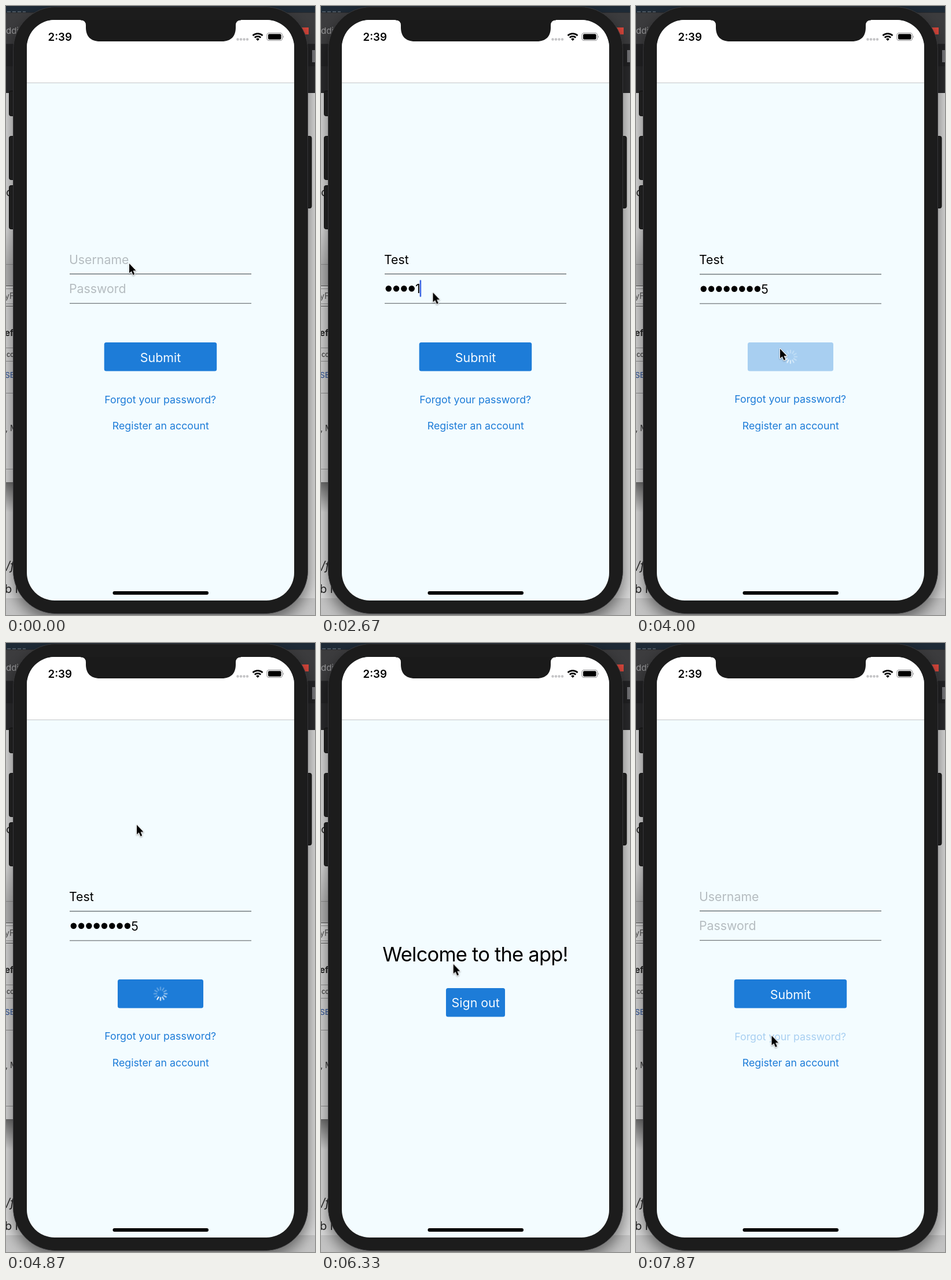
Write an HTML page that moves like this. It is 534 px wide and 1050 px high and loops after 8 s.

```html
<!DOCTYPE html>
<html lang="en">
<head>
<meta charset="utf-8">
<title>Sign-in demo</title>
<style>
  html, body { margin: 0; width: 100%; height: 100%; overflow: hidden; background: #d0d0d0; }
  svg { display: block; width: 100%; height: 100%; }
  text { font-family: Inter, Roboto, sans-serif; font-optical-sizing: none; white-space: pre; }
  .mid { text-anchor: middle; }
  .field { font-size: 21.3px; fill: #000; }
  .field.empty { fill: #b5bcc0; }
  .label { font-size: 21.4px; fill: #f4faff; }
  .link { font-size: 17.8px; fill: #1d7cd8; }
  .title { font-size: 34.5px; letter-spacing: -.8px; }
  .blue { fill: #1d7cd8; }
  .rule { stroke: #72787b; stroke-width: 1.3; }
  .edge { stroke: #8f8f8f; }

  #pointer { animation: move 8s infinite; }
  #submit { animation: press-submit 8s linear infinite; }
  #signout { animation: press-signout 8s linear infinite; }
  #forgot { animation: press-forgot 8s linear infinite; }
  #spokes { animation: spin 1s steps(12) infinite; }

  @keyframes move {
    0% { transform: translate(213px, 444px); }
    12.2% { transform: translate(213px, 444px); animation-timing-function: ease-in; }
    14.1% { transform: translate(197px, 485px); animation-timing-function: ease-out; }
    16.5% { transform: translate(193.5px, 494px); }
    43% { transform: translate(193.5px, 494px); animation-timing-function: ease-in-out; }
    48% { transform: translate(249px, 591px); }
    51.5% { transform: translate(249px, 591px); animation-timing-function: ease-in-out; }
    59% { transform: translate(226px, 313.5px); }
    74.6% { transform: translate(226px, 313.5px); animation-timing-function: ease-in; }
    79.1% { transform: translate(228.5px, 552px); animation-timing-function: ease-out; }
    81.6% { transform: translate(238px, 613px); }
    87.5% { transform: translate(238px, 613px); animation-timing-function: ease-in-out; }
    95.5%, 100% { transform: translate(234.5px, 677px); }
  }
  @keyframes press-submit {
    0%, 48.2% { opacity: 1; }
    49%, 50.4% { opacity: .35; }
    53.4%, 100% { opacity: 1; }
  }
  @keyframes press-signout {
    0%, 82% { opacity: 1; }
    83.5%, 85% { opacity: .35; }
    86.6%, 100% { opacity: 1; }
  }
  @keyframes press-forgot {
    0%, 96.5% { opacity: 1; }
    98.2%, 100% { opacity: .35; }
  }
  @keyframes spin { to { transform: rotate(360deg); } }
</style>
</head>
<body>
<svg viewBox="0 0 534 1050" preserveAspectRatio="none">
  <defs>
    <clipPath id="screen"><rect x="36" y="24" width="462" height="1001" rx="48"/></clipPath>
    <filter id="shadow" x="-20%" y="-10%" width="140%" height="120%">
      <feDropShadow dx="0" dy="12" stdDeviation="13" flood-color="#000" flood-opacity=".5"/>
    </filter>
    <linearGradient id="fall" x2="0" y2="1">
      <stop offset="0" stop-color="#000" stop-opacity=".5"/>
      <stop offset="1" stop-color="#000" stop-opacity="0"/>
    </linearGradient>
    <linearGradient id="rise" x2="0" y2="1">
      <stop offset="0" stop-color="#000" stop-opacity="0"/>
      <stop offset="1" stop-color="#000" stop-opacity=".16"/>
    </linearGradient>
  </defs>

  <!-- desktop behind the phone -->
  <rect width="534" height="1050" fill="#dadada"/>
  <rect width="534" height="150" fill="#2b2b2d"/>
  <rect width="534" height="11" fill="#1e2a36"/>
  <path d="M2 10H34" stroke="#77828c" stroke-dasharray="6 3"/>
  <rect y="12" width="534" height="53" fill="#3c3c3e"/>
  <rect y="66" width="534" height="38" fill="#232325"/>
  <rect x="511" y="37" width="12" height="12" fill="#d9473c"/>
  <rect x="529" y="76" width="5" height="21" fill="#77777b"/>
  <text x="0" y="48" font-size="15" fill="#98989a">ddi</text>
  <text x="0" y="328" font-size="20" fill="#222">o</text>
  <rect y="385" width="40" height="60" fill="url(#rise)"/>
  <rect y="446" width="40" height="36" fill="#b4b4b4"/>
  <rect y="518" width="40" height="303" fill="#d4d4d4"/>
  <path class="edge" d="M0 445.5H40M0 487.5H40M0 513.5H40M0 589.5H40M0 612.5H40M0 667.5H40M0 798.5H40"/>
  <path d="M0 482.5H40M0 517.5H40" stroke="#555"/>
  <text x="-2" y="505" font-size="14" fill="#555">yF</text>
  <text x="-2" y="569" font-size="15" font-weight="700" fill="#222">efo</text>
  <text x="1" y="605" font-size="11" fill="#222">co</text>
  <text x="-2" y="641" font-size="13.5" font-weight="500" fill="#3c5f9f">SE</text>
  <text x="-1" y="733" font-size="14" fill="#333">, M</text>
  <rect y="821" width="40" height="52" fill="url(#fall)"/>
  <text x="0" y="972" font-size="20" font-style="italic" fill="#222">/fi</text>
  <text x="-2" y="1012" font-size="20" fill="#222">b r</text>
  <rect y="1021" width="534" height="29" fill="#c4c4c4"/>

  <!-- phone body -->
  <g fill="#242424" stroke="#111">
    <rect x="5.5" y="146.5" width="14" height="43" rx="3"/>
    <rect x="5.5" y="224.5" width="14" height="75" rx="3"/>
    <rect x="5.5" y="309.5" width="14" height="75" rx="3"/>
    <rect x="514" y="224.5" width="14" height="124" rx="3"/>
  </g>
  <rect x="12.5" y="1.5" width="509" height="1046" rx="74" fill="#1a1a1a" stroke="#38383a" filter="url(#shadow)"/>

  <g clip-path="url(#screen)">
    <rect x="36" y="24" width="462" height="1001" fill="#f3fcff"/>
    <rect x="36" y="24" width="462" height="108" fill="#fff"/>
    <path d="M36 132.5H498" stroke="#c3c6c8"/>
    <path d="M129 23v1.5q9 0 9 9v3.500c0 15 8 24 24 24h211c16 0 24-9 24-24v-3.500q0-9 9-9V23z" fill="#1a1a1a"/>
  </g>

  <!-- status bar -->
  <text x="72.5" y="59.500" font-size="18.7" font-weight="600">2:39</text>
  <g fill="#c4c4c6">
    <circle cx="400.500" cy="57.500" r="2.200"/><circle cx="406" cy="57.500" r="2.200"/>
    <circle cx="411.500" cy="57.500" r="2.200"/><circle cx="417" cy="57.500" r="2.200"/>
  </g>
  <path d="M426.5 50.9A12.5 12.5 0 0 1 443.5 50.9M429.75 54.4A7.7 7.7 0 0 1 440.25 54.4" fill="none" stroke="#000" stroke-width="2.7"/>
  <path d="M435 60l-2.900-3.100a4.200 4.200 0 0 1 5.800 0z"/>
  <rect x="451" y="46.500" width="26.500" height="13" rx="3.600" fill="none" stroke="#8e8e90" stroke-width="1.100"/>
  <rect x="453" y="48.300" width="22.500" height="9.400" rx="2"/>
  <path d="M479 50.500q2 2.500 0 5z" fill="#8e8e90"/>
  <rect x="184.500" y="1009" width="165.500" height="6" rx="3"/>

  <g id="login">
    <g id="inputs">
      <text id="user" class="field" x="109" y="444.500"></text>
      <g id="dots"></g>
      <text id="pass" class="field" y="495"></text>
      <path class="rule" d="M110 462H424M110 512.600H424"/>
      <rect id="caret" width="2.500" height="29" rx="1" fill="#3a63df"/>
    </g>
    <g id="submit">
      <rect id="plate" class="blue" y="580" height="49.500" rx="3.500"/>
      <text id="caption" class="label mid" x="267" y="613.500">Submit</text>
      <g id="spinner" transform="translate(267 604.700)"><g id="spokes"></g></g>
    </g>
    <g id="links">
      <text id="forgot" class="link mid" x="266.700" y="684.500">Forgot your password?</text>
      <text class="link mid" x="267.300" y="730">Register an account</text>
    </g>
  </g>

  <g id="home">
    <text class="title mid" x="266.500" y="548.500">Welcome to the app!</text>
    <g id="signout">
      <rect class="blue" x="216" y="595" width="102" height="49.500" rx="3.500"/>
      <text class="label mid" x="267.200" y="628.300">Sign out</text>
    </g>
  </g>

  <g id="pointer">
    <path d="M0 0V16.500L3.800 13.200 6.500 19.800 9.300 18.600 6.600 12.200H11.600Z" fill="#000" stroke="#fff" stroke-width="2"
      stroke-linejoin="round" paint-order="stroke" style="filter: drop-shadow(0 1px 1px rgba(0,0,0,.35))"/>
  </g>
</svg>
<script>
const LOOP = 8000, PITCH = 13.3;
const FOCUS_PASS = 1330, SEND = 3930, ENTER = 5525, LEAVE = 6925;
const userKeys = { word: 'Test', at: [65, 325, 465, 595] };
const passKeys = { word: 'Test12345', at: [1995, 2265, 2395, 2465, 2660, 2725, 2865, 2995, 3130] };

const el = id => document.getElementById(id);
const show = (node, on) => node.setAttribute('visibility', on ? 'visible' : 'hidden');

function add(parent, tag, attrs) {
  const node = document.createElementNS('http://www.w3.org/2000/svg', tag);
  for (const key in attrs) node.setAttribute(key, attrs[key]);
  return parent.appendChild(node);
}

const dots = passKeys.at.map((_, i) =>
  add(el('dots'), 'circle', { cx: 116.8 + i * PITCH, cy: 487.3, r: 5.2 }));

// the head spoke is the brightest, the ones behind it fade
for (let i = 0; i < 12; i++) {
  add(el('spokes'), 'path', {
    d: 'M0-6.700V-11.200', stroke: '#fff', 'stroke-width': 2.2, 'stroke-linecap': 'round',
    opacity: Math.max(.3, 1 - i * .12), transform: `rotate(${270 - i * 30})`
  });
}

const typed = (keys, t) => t >= LEAVE ? 0 : keys.at.filter(k => k <= t).length;

function setField(node, text, hint, x) {
  node.textContent = text || hint;
  node.classList.toggle('empty', !text);
  node.setAttribute('x', x);
}

function render(t) {
  const home = t >= ENTER && t < LEAVE;
  const busy = t >= SEND && t < ENTER;
  const n = typed(passKeys, t);
  const hidden = Math.max(0, n - 1);
  const inPass = t >= FOCUS_PASS;

  el('login').style.display = home ? 'none' : '';
  el('home').style.display = home ? '' : 'none';

  setField(el('user'), userKeys.word.slice(0, typed(userKeys, t)), 'Username', 109);
  setField(el('pass'), n ? passKeys.word[n - 1] : '', 'Password', 109 + (n ? .8 : 0) + hidden * PITCH);
  dots.forEach((dot, i) => show(dot, i < hidden));

  const node = inPass ? el('pass') : el('user');
  const width = node.classList.contains('empty') ? 1.5 : node.getComputedTextLength();
  const caret = el('caret');
  caret.setAttribute('x', +node.getAttribute('x') + width - 1);
  caret.setAttribute('y', inPass ? 472.5 : 422);
  show(caret, t >= userKeys.at[0] && t < SEND);

  el('inputs').setAttribute('transform', `translate(0 ${busy ? .5 : 0})`);
  el('links').setAttribute('transform', `translate(0 ${busy ? -.4 : 0})`);
  el('plate').setAttribute('x', busy ? 193 : 169.700);
  el('plate').setAttribute('width', busy ? 148 : 194.500);
  show(el('caption'), !busy);
  show(el('spinner'), busy);
}

let start;
function tick(now) {
  start ??= now;
  render((now - start) % LOOP);
  requestAnimationFrame(tick);
}
render(0);
requestAnimationFrame(tick);
</script>
</body>
</html>
```
